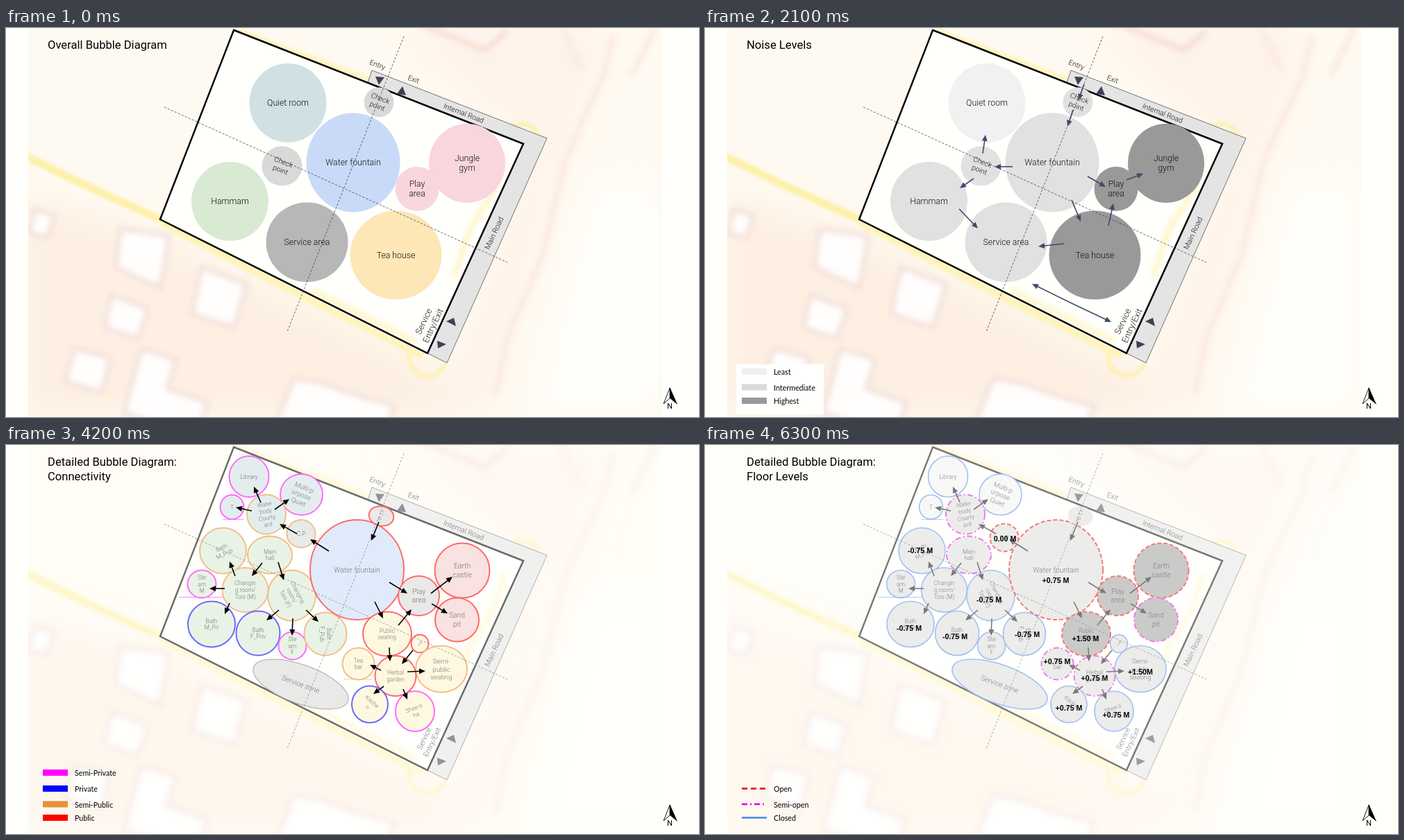
An HTML page that plays this animation: 998x561 px, repeating every 7000 ms.

```html
<!DOCTYPE html>
<html lang="en">
<head>
<meta charset="utf-8">
<title>Bubble Diagram</title>
<style>
  html, body { margin: 0; width: 100%; height: 100%; overflow: hidden; background: #fffffb; }
  svg { display: block; width: 998px; height: 561px; }
  text { font-family: Roboto, sans-serif; dominant-baseline: central; }
  .label { font-weight: 300; fill: #111; text-anchor: middle; }
  .legend { font: 10.7px Lato, sans-serif; }
  .level { font: bold 10.7px "Liberation Sans", Arial, sans-serif; text-anchor: middle; }
</style>
</head>
<body>
<svg viewBox="0 0 998 561">
  <defs>
    <filter id="soft" x="-20%" y="-20%" width="140%" height="140%"><feGaussianBlur stdDeviation="4"/></filter>
    <filter id="haze" x="-30%" y="-30%" width="160%" height="160%"><feGaussianBlur stdDeviation="24"/></filter>
    <clipPath id="mapArea"><path d="M32 0H945V561H32z"/></clipPath>
  </defs>
  <rect width="998" height="561" fill="#fffffb"/>
  <g clip-path="url(#mapArea)" fill="none">
    <path d="M32 0H945V561H32z" fill="#fffaf1"/>
    <g filter="url(#haze)">
      <path d="M20 240L220 300 600 480 690 561H20z" fill="#fdf0e2"/>
      <path d="M560 0H870L800 190 690 561H620L760 170z" fill="#fef3e8"/>
      <path d="M840 220H945V561H760z" fill="#fffefa"/>
    </g>
    <g filter="url(#soft)">
      <path d="M875 10L860 70 805 190 772 330 722 445 705 530M800 0L830 60M935 0L900 70" stroke="#fbeae2" stroke-width="9"/>
      <path d="M590 -8L690 32 722 4" fill="#fdf4ed" stroke="#f5d5cc" stroke-width="6"/>
      <g fill="#fffefd" stroke="#f3ddd8" stroke-width="6">
        <path d="M165 290L235 300 222 375 158 345z"/>
        <path d="M282 345L347 370 328 432 268 412z"/>
        <path d="M152 385L205 405 190 448 142 432z"/>
        <path d="M195 462L245 478 232 520 290 540 275 590 170 555z"/>
        <path d="M98 462L150 475 138 525 86 510z"/>
        <path d="M415 505L455 512 505 530 560 545 540 600 385 580z"/>
        <path d="M42 262L70 270 60 302 32 296z"/>
      </g>
    </g>
    <g stroke="#fdf0a9" style="filter:blur(2px)">
      <path d="M25 183L110 225 222 276" stroke-width="11"/>
      <path d="M222 280L425 386 600 473" stroke="#fff3b8" stroke-width="10"/>
      <path d="M335 4L525 75" stroke="#fff2bb" stroke-width="7"/>
      <path d="M582 467A25 25 0 1 0 632 484M728 144A24 24 0 0 1 766 154" stroke-width="5"/>
    </g>
  </g>
  <path d="M328 3L745 167 607 469 222 276z" fill="#fffffc"/>
  <path d="M718 185L703 235 668 290 645 360 M440 378L590 452" fill="none" stroke="#fff6cf" stroke-width="9" style="filter:blur(3px)"/>
  <g id="scene"></g>
</svg>
<script>
const STEP = 700;
const RED = '#ff0000', BLUE = '#0000ff', ORANGE = '#e69138', MAGENTA = '#ff00ff';
const NAVY = '#3f4b68', GREY = '#d9d9d9', TEAL = '#d0e0e3', GREEN = '#d9ead3', CREAM = '#fff2cc', ROSE = '#f4cccc';

// Privacy: p private, u public, s semi-public, v semi-private
const softPrivacy = { p: '#4a8ccb', u: '#d02733', s: '#eba04b' };
const privacy = { p: BLUE, u: RED, s: ORANGE, v: MAGENTA };
// Openness: o open, h semi-open, c closed, - none
const openness = { o: ['#e60000', '6 3'], h: ['#e000e0', '8 3.5 2 3.5'], c: ['#4a86e8', ''] };

// [x, y, rx, ry, label, text size, text angle, privacy, noise, openness, ellipse angle]
const paint = (fill, rows) => rows.map(row => ({ fill, row }));
const overall = [
  ...paint(TEAL, [[406, 108, 55.5, 57, 'Quiet room', 12.3, 0, 'p', 0]]),
  ...paint('#c9daf8', [[500, 194, 67.5, 71.5, 'Water fountain', 12.3, 0, 'u', 1]]),
  ...paint(GREY, [
    [537, 107, 21.5, 21.5, 'Check|point', 10.2, 21, 'u', 1],
    [397.5, 199, 29, 28.5, 'Check|point', 10.2, 21, 's', 1]]),
  ...paint(GREEN, [[322.5, 250, 55.5, 57, 'Hammam', 12.3, 0, 's', 1]]),
  ...paint('#b7b7b7', [[433.5, 309, 59, 57.5, 'Service area', 12.3, 0, 'p', 1]]),
  ...paint('#fde7b7', [[561.5, 327.5, 66, 64, 'Tea house', 12.3, 0, 'u', 2]]),
  ...paint('#f9d6de', [
    [664, 195, 55, 57, 'Jungle|gym', 12.3, 0, 'u', 2],
    [592, 232, 31.5, 32, 'Play|area', 12.3, 0, 'u', 2]])
];
const detailed = [
  ...paint(TEAL, [
    [350, 45.5, 28.5, 29.5, 'Library', 8.5, 0, 'v', 0, 'c'],
    [425.5, 71.5, 30.5, 29.5, 'Multi-p|urpose|Quiet', 9.5, 22, 'v', 0, 'c'],
    [325.5, 89.5, 17, 17.5, 'T', 8.3, 0, 'v', 0, 'c'],
    [375, 100, 28, 28.5, 'Water|body|Courty|ard', 8.4, -10, 's', 1, 'h']]),
  ...paint(GREEN, [
    [312.5, 152.5, 33.5, 33, 'Bath|M_Pub', 8.4, -25, 's', 1, 'c'],
    [380, 158.5, 32, 27, 'Main|hall', 8.4, 0, 's', 1, 'h'],
    [282, 200.5, 20.5, 20, 'Ste|am|M', 8.4, 0, 'v', 1, 'c'],
    [344.5, 209, 33, 32, 'Changin|g room/|Tois  (M)', 8.4, 0, 's', 1, 'c'],
    [411.5, 217, 34.5, 36.5, 'Changing|room/|Tois (F)', 8.4, 62, 's', 1, 'c'],
    [296, 258.5, 34, 33, 'Bath|M_Pri', 8.4, 0, 'p', 1, 'c'],
    [363, 271.5, 31.5, 32, 'Bath|F_Priv', 8.4, 0, 'p', 1, 'c'],
    [412.5, 289.5, 20, 20, 'Ste|am|F', 8.4, 0, 'v', 1, 'c'],
    [460, 272.5, 30.5, 31, 'Bath|F_Pub', 8.4, 90, 's', 1, 'c']]),
  ...paint('#c9daf8', [[505.5, 180, 67.5, 72, 'Water fountain', 10.3, 0, 'u', 1, 'o']]),
  ...paint(GREY, [
    [425, 128, 20.5, 20, 'C.P', 8.4, 0, 's', 1, 'o'],
    [540.5, 102.5, 18, 14, 'C.|P.', 8.4, 22, 'u', 1, '-', 12],
    [594.5, 217.5, 29.5, 28.5, 'Play|area', 10.4, 0, 'u', 2, 'o'],
    [424.5, 345, 72.2, 27.9, 'Service zone', 10.3, 20, 'p', 1, 'c', 20]]),
  ...paint(ROSE, [
    [657, 181, 39.5, 39.5, 'Earth|castle', 10.3, 0, 'u', 2, 'o'],
    [649.5, 252, 31.5, 31.5, 'Sand|pit', 10.3, 0, 'u', 2, 'h']]),
  ...paint(CREAM, [
    [549, 272.5, 35, 32, 'Public|seating', 8.2, 0, 'u', 2, 'o'],
    [596, 286.5, 12.5, 13, 'T', 9, 35, 'u', 1, 'c'],
    [627, 323, 37, 33.5, 'Semi-|public|seating', 9.7, 0, 's', 1, 'c'],
    [507.5, 315.5, 23, 23, 'Tea|bar', 8.4, 0, 's', 1, 'h'],
    [561, 333, 29.5, 29, 'Herbal|garden', 8.4, 0, 'u', 1, 'h'],
    [524, 374, 26, 26.5, 'Kitche|n', 8.4, 40, 'p', 1, 'c'],
    [589, 384, 28, 29, 'Shee-s|ha', 8.4, -20, 'v', 1, 'c']])
];

const overallArrows = [
  [546, 81, 538, 104], [530, 118, 522, 142], [443, 200, 417, 200], [400, 181, 404, 154],
  [387, 217, 367, 231], [366, 261, 393, 289], [551, 214, 577, 229], [528, 248, 541, 279],
  [517, 311, 480, 315], [581, 285, 588, 253], [607, 219, 631, 210],
  [528, 397, 585, 424], [528, 397, 471, 369]
];
const detailedArrows = [
  [465, 153, 438, 136], [419, 128, 394, 114], [367, 83, 357, 60], [387, 93, 408, 78], [354, 95, 331, 90],
  [369, 170, 354, 189], [392, 169, 400, 195], [330, 189, 322, 168], [315, 207, 293, 207], [322, 228, 315, 244],
  [393, 238, 375, 253], [413, 250, 412, 275], [432, 238, 450, 255], [537, 111, 526, 138], [552, 198, 578, 214],
  [531, 226, 543, 250], [565, 260, 584, 237], [612, 214, 643, 190], [613, 229, 636, 243], [552, 292, 553, 312],
  [586, 296, 570, 316], [540, 325, 524, 317], [578, 327, 604, 326], [544, 348, 529, 359], [572, 352, 578, 367]
];
const levels = [
  ['0.00 M', 432, 135], ['-0.75 M', 310, 152], ['-0.75 M', 409, 223], ['-0.75 M', 294, 264],
  ['-0.75 M', 360, 276], ['-0.75 M', 464, 273], ['+0.75 M', 505, 195], ['+1.50 M', 548, 279],
  ['+0.75 M', 507, 312], ['+0.75 M', 561, 336], ['+1.50M', 627, 327], ['+0.75 M', 524, 379], ['+0.75 M', 592, 389]
];

const label = (x, y, text, size, angle = 0) => {
  const lines = text.split('|');
  return `<g class="label" font-size="${size}" transform="translate(${x} ${y}) rotate(${angle})">` +
    lines.map((s, i) => `<text y="${(i - (lines.length - 1) / 2) * size * 1.18}">${s}</text>`).join('') + '</g>';
};

const arrow = color => ([x1, y1, x2, y2]) => {
  const length = Math.hypot(x2 - x1, y2 - y1), angle = Math.atan2(y2 - y1, x2 - x1) * 180 / Math.PI;
  return `<g transform="translate(${x1} ${y1}) rotate(${angle})"><path d="M0 0H${length - 7}" stroke="${color}" stroke-width="1.6"/>` +
    `<path d="M${length} 0l-9 -4v8z" fill="${color}"/></g>`;
};

const outlineOf = (scene, mode, open) =>
  scene.outline === 'soft' ? [softPrivacy[mode], ''] :
  scene.outline === 'privacy' ? [privacy[mode], ''] :
  scene.outline === 'open' && openness[open] || ['none', ''];

function bubble({ fill, row }, scene) {
  let [x, y, rx, ry, text, size, angle, mode, noise, open, tilt = 0] = row;
  if (text === 'C.P' && scene.outline === 'open') { x += 6; y += 5.5; }
  if (scene.outline === 'soft' && text === 'Play|area') fill = GREY;
  if (scene.noise) fill = ['#f1f1f1', scene.set === overall ? '#e1e1e1' : GREY, '#999'][noise];
  let [stroke, dash] = outlineOf(scene, mode, open);
  let width = 2;
  if (scene.outline === 'open' && !dash) width = 1.6;
  if (scene.plainService && text === 'Service zone') { stroke = '#666'; width = 1; }
  let rule = '';
  if (scene.outline === 'privacy' || scene.outline === 'open') {
    if (text === 'T' && x < 400) rule = 'M312 107.5H343';
    if (text === 'Ste|am|M') rule = 'M249 219.5H316';
    if (text === 'Tea|bar' && scene.outline === 'privacy') rule = 'M486 338H526';
  }
  return `<ellipse rx="${rx}" ry="${ry}" transform="translate(${x} ${y}) rotate(${tilt})" fill="${fill}" stroke="${stroke}" ` +
    `stroke-width="${width}" stroke-dasharray="${dash}"/><path d="${rule}" stroke="${stroke}" stroke-width=".8"/>` +
    label(x, y, text, size, angle);
}

const site = scene => `
  <path d="M527 61L779 159 635 483 607 469 745 167 521 79z" fill="#e4e4e4" stroke="#666" stroke-width=".9"/>
  <path d="M328 3L745 167 607 469 222 276z" fill="none" stroke="#000" stroke-width="2.5"/>
  <path d="M532 70L545 71 537 82zM563 95L576 97 571 84zM634 423L645 418 648 430zM621 451L634 456 622 462z" fill="#3f4152"/>` +
  label(535, 53, 'Entry', 10.5, 20) + label(587, 74, 'Exit', 10.5, 20) +
  label(659, 123, 'Internal Road', 10.5, 21) + label(703, 296, 'Main Road', 10.7, -65) +
  label(608, 426, 'Service|Entry/Exit', scene.set === overall ? 12.4 : 10.6, -65);

const axes = '<path d="M228 114L722 338M573 12L405 438" fill="none" stroke="#444" stroke-width=".8" stroke-dasharray="3.2 2.2"/>';

const compass = `<path d="M956 519L947 542 956 534z" fill="#fff" stroke="#000" stroke-width=".9"/>
  <path d="M956 518L967 543 956 534z"/><text x="956" y="545" font-size="11" text-anchor="middle">N</text>`;

const bar = (color, y) => `<path d="M53 ${y}H89" stroke="${color}" stroke-width="9"/>`;
const line = (color, y, dash = '') => `<path d="M53 ${y}H89" stroke="${color}" stroke-width="2.3" stroke-dasharray="${dash}"/>`;
const dashedLine = (style, y) => line(style[0], y, style[1] && (style[1] === '6 3' ? '8 5' : '8 4 2 4'));
const legends = {
  soft: [line, ['Private', '#3d85c6'], ['Public', '#cc0000'], ['Semi-Public', ORANGE]],
  noise: [bar, ['Least', '#efefef'], ['Intermediate', GREY], ['Highest', '#999']],
  privacy: [bar, ['Semi-Private', MAGENTA], ['Private', BLUE], ['Semi-Public', ORANGE], ['Public', RED]],
  open: [dashedLine, ['Open', openness.o], ['Semi-open', openness.h], ['Closed', openness.c]]
};
function legend(name) {
  if (!name) return '';
  const [mark, ...items] = legends[name];
  const rows = [472.5, 495.5, 518, 537.5].slice(-items.length);
  return (name === 'noise' ? '<path d="M45 485H171V557H45z" fill="#fffffd"/>' : '') +
    items.map(([text, style], i) => mark(style, rows[i]) + `<text class="legend" x="99" y="${rows[i]}">${text}</text>`).join('');
}

const prefix = 'Detailed Bubble Diagram';
const scenes = [
  { title: 'Overall Bubble Diagram', set: overall },
  { title: 'Public v/s Private', set: overall, outline: 'soft', legend: 'soft' },
  { title: 'Connectivity', set: overall, outline: 'soft', legend: 'soft', wash: .4, arrows: true },
  { title: 'Noise Levels', set: overall, noise: true, legend: 'noise', arrows: true },
  { title: prefix, set: detailed },
  { title: 'Public v/s Private', set: detailed, outline: 'privacy', legend: 'privacy' },
  { title: prefix + ':|Connectivity', set: detailed, outline: 'privacy', legend: 'privacy', wash: .42, arrows: true, plainService: true },
  { title: prefix + ':|Noise Levels', set: detailed, noise: true, legend: 'noise', arrows: true },
  { title: prefix + ':|Open v/s Closed', set: detailed, noise: true, outline: 'open', legend: 'open', arrows: true },
  { title: prefix + ':|Floor Levels', set: detailed, noise: true, outline: 'open', legend: 'open', wash: .48, arrows: true, arrowsBelow: true, levels: true }
];

function draw(scene) {
  const arrows = !scene.arrows ? '' : scene.set === overall
    ? overallArrows.map(arrow(NAVY)).join('') : detailedArrows.map(arrow('#000')).join('');
  const wash = `<rect width="998" height="561" fill="#fffffd" opacity="${scene.wash || 0}"/>`;
  const title = scene.title.split('|').map((s, i) => `<text x="60" y="${24.5 + i * 20.5}" font-size="16.6">${s}</text>`).join('');
  return site(scene) + scene.set.map(b => bubble(b, scene)).join('') + axes +
    (scene.arrowsBelow ? arrows + wash : wash + arrows) + title + legend(scene.legend) + compass +
    (scene.levels ? levels.map(([s, x, y]) => `<text class="level" x="${x}" y="${y}">${s}</text>`).join('') : '');
}

const stage = document.getElementById('scene');
const start = performance.now();
let shown = -1;
function tick() {
  const index = Math.floor((performance.now() - start) / STEP) % scenes.length;
  if (index !== shown) stage.innerHTML = draw(scenes[shown = index]);
  requestAnimationFrame(tick);
}
tick();
</script>
</body>
</html>
```
